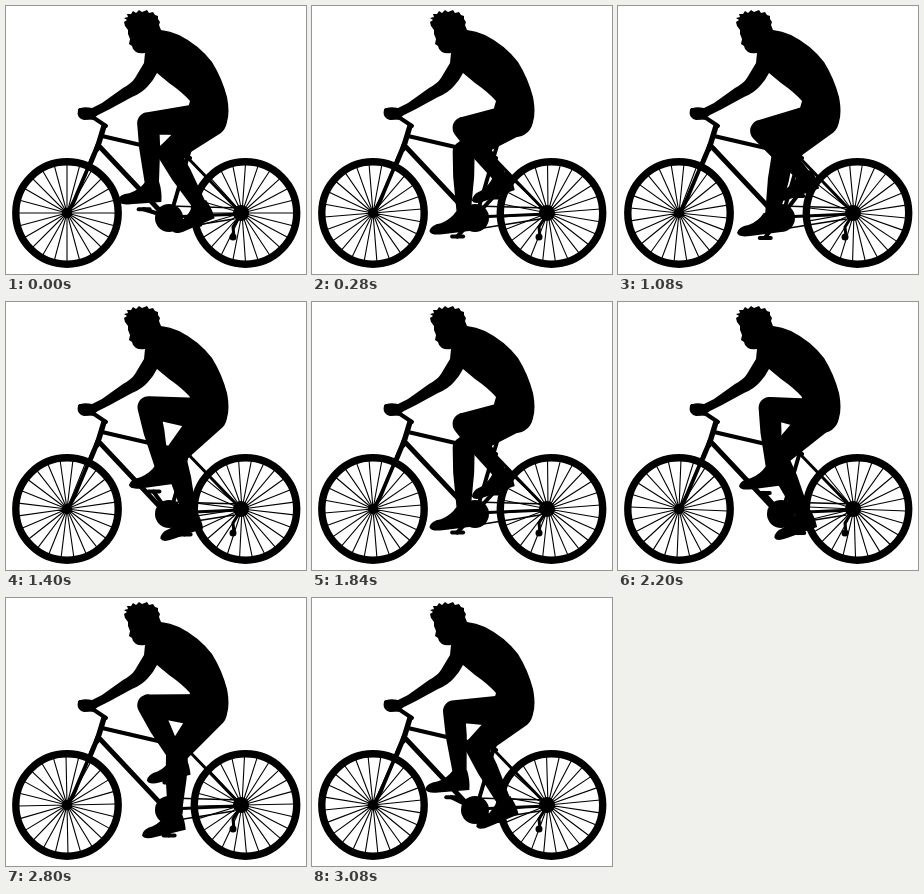
An HTML page that plays this animation: 300 by 268 pixels, repeating every 3.12 s.

```html
<!DOCTYPE html>
<html lang="en">
<head>
<meta charset="utf-8">
<title>Cyclist</title>
<style>
  html, body { margin: 0; width: 100%; height: 100%; overflow: hidden; background: #fff; }
  svg { display: block; width: 100vw; height: 100vh; }
  .line { fill: none; stroke: #000; stroke-linecap: round; stroke-linejoin: round; }
</style>
</head>
<body>
<svg viewBox="0 0 300 268">
  <g id="wheels"></g>

  <g class="line">
    <path stroke-width="5.5" d="M98 120 L91 143"/>
    <path stroke-width="5" d="M92 139 L85 156"/>
    <path stroke-width="3.8" d="M87 150 L71 188 Q67 199 61 207"/>
    <path stroke-width="4.2" d="M96 130 L152 143 L184 152"/>
    <path stroke-width="4.8" d="M94 141 L155 206"/>
    <path stroke-width="4" d="M189 126 L165 208"/>
    <path stroke-width="3" d="M181 151 L235 207"/>
    <path stroke-width="3" d="M164 211 L235 208"/>
    <path stroke-width="1.5" d="M163 200 L235 202 M165 223 L228 213"/>
    <path stroke-width="3" d="M235 208 L227 221 L228 231"/>
    <path stroke-width="4" d="M74 104 L78 111 L88 112 L100 120"/>
  </g>
  <circle cx="235" cy="207" r="8"/>
  <circle cx="227" cy="231" r="3.5"/>
  <circle cx="163" cy="212" r="14"/>

  <g id="legs"></g>

  <path d="M118 16 L121 14 L118 12 L122 11 L121 8 L125 8 L127 5 L130 7 L133 4 L136 6
    L141 4 L143 7 L147 6 L149 9 L152 10 L152 13 L154 16 L153 19 L155 24
    Q164 25 173 29 Q193 39 206 56 Q216 72 221 91 Q224 106 221 116 Q217 126 208 129
    L195 130 Q187 126 185 116 L182 102 L184 95 Q176 86 163 77
    L151 67 Q147 75 142 80 Q136 87 126 91 L104 103 L92 109 Q86 114 78 114
    Q70 112 72 104 Q75 100 86 102 L96 97 L117 82 Q126 77 129 72 L138 57 L139 47
    Q133 48 130 46 L127 43 L126 40 L123 38 L124 33 L122 28 L122 24 L119 20 Z"/>
</svg>
<script>
const NS = "http://www.w3.org/2000/svg";
const LOOP = 3120, STEP = 40, TURN = 1560;
const SPOKES = 24;
const CRANK = { x: 163, y: 211, r: 26.5 };
const START = -17 * Math.PI / 180;

function add(parent, tag, attrs = {}) {
  const node = document.createElementNS(NS, tag);
  for (const key in attrs) node.setAttribute(key, attrs[key]);
  return parent.appendChild(node);
}

function makeWheel(x, y, hubX) {
  const root = add(document.getElementById("wheels"), "g");
  add(root, "circle", { cx: x, cy: y, r: 51.2, class: "line", "stroke-width": 7.4 });
  add(root, "circle", { cx: hubX, cy: y, r: 5 });
  return { x, y, hubX, spokes: add(root, "path", { class: "line", "stroke-width": 1.1 }) };
}

function makeLeg(hip, thigh, shin, phase) {
  const root = add(document.getElementById("legs"), "g");
  return {
    hip, thigh, shin, phase,
    crank: add(root, "path", { class: "line", "stroke-width": 4 }),
    pedal: add(root, "path", { class: "line", "stroke-width": 4 }),
    limb: add(root, "path"),
    shoe: add(root, "path", {
      d: "M-7 -7 L7 -7 Q10 3 9 13 L-22 15 Q-34 16 -35 11 Q-33 5 -23 4 Q-13 1 -7 -7Z"
    })
  };
}

// Outline of a limb segment between two circles.
function capsule(a, ra, b, rb) {
  const len = Math.hypot(b.x - a.x, b.y - a.y);
  const nx = (a.y - b.y) / len, ny = (b.x - a.x) / len;
  return `M${a.x + nx * ra} ${a.y + ny * ra}L${b.x + nx * rb} ${b.y + ny * rb}` +
    `A${rb} ${rb} 0 0 0 ${b.x - nx * rb} ${b.y - ny * rb}` +
    `L${a.x - nx * ra} ${a.y - ny * ra}A${ra} ${ra} 0 0 0 ${a.x + nx * ra} ${a.y + ny * ra}Z`;
}

function mix(a, b, t) {
  return { x: a.x + (b.x - a.x) * t, y: a.y + (b.y - a.y) * t };
}

// Knee position from hip and ankle, always bending forward.
function findKnee(hip, ankle, thigh, shin) {
  const dx = ankle.x - hip.x, dy = ankle.y - hip.y, d = Math.hypot(dx, dy);
  const along = (thigh ** 2 - shin ** 2 + d * d) / (2 * d);
  const out = Math.sqrt(Math.max(0, thigh ** 2 - along ** 2));
  return { x: hip.x + (dx * along - dy * out) / d, y: hip.y + (dy * along + dx * out) / d };
}

function poseLeg(leg, turn) {
  const angle = START + turn + leg.phase, c = Math.cos(angle), s = Math.sin(angle);
  const pedal = { x: CRANK.x - CRANK.r * c, y: CRANK.y + CRANK.r * s };
  const ankle = { x: pedal.x + 8 - 2 * s, y: pedal.y - 18 - 2 * c + s };
  const knee = findKnee(leg.hip, ankle, leg.thigh, leg.shin);
  const calf = mix(knee, ankle, 0.38);
  leg.crank.setAttribute("d", `M${CRANK.x} ${CRANK.y}L${pedal.x} ${pedal.y}`);
  leg.pedal.setAttribute("d", `M${pedal.x - 5} ${pedal.y}h11`);
  leg.limb.setAttribute("d", capsule(leg.hip, 17, knee, 11) +
    capsule(knee, 11, calf, 10.5) + capsule(calf, 10.5, ankle, 6.5));
  leg.shoe.setAttribute("transform", `translate(${ankle.x} ${ankle.y}) rotate(${-10 + 10 * c})`);
}

function spinWheel(wheel, turn) {
  let d = "";
  for (let i = 0; i < SPOKES; i++) {
    const a = i * 2 * Math.PI / SPOKES - turn;
    d += `M${wheel.hubX} ${wheel.y}L${wheel.x + 49 * Math.cos(a)} ${wheel.y + 49 * Math.sin(a)}`;
  }
  wheel.spokes.setAttribute("d", d);
}

const wheels = [makeWheel(61, 207, 61), makeWheel(239.5, 207, 236)];
const legs = [
  makeLeg({ x: 204, y: 114 }, 53, 65, Math.PI),
  makeLeg({ x: 203, y: 113 }, 61, 66, 0)
];

function render(ms) {
  const time = Math.floor((ms % LOOP) / STEP) * STEP;
  const turn = time / TURN * 2 * Math.PI;
  legs.forEach(leg => poseLeg(leg, turn));
  wheels.forEach(wheel => spinWheel(wheel, turn));
}

const begin = performance.now();
function tick() {
  render(performance.now() - begin);
  requestAnimationFrame(tick);
}
tick();
</script>
</body>
</html>
```
